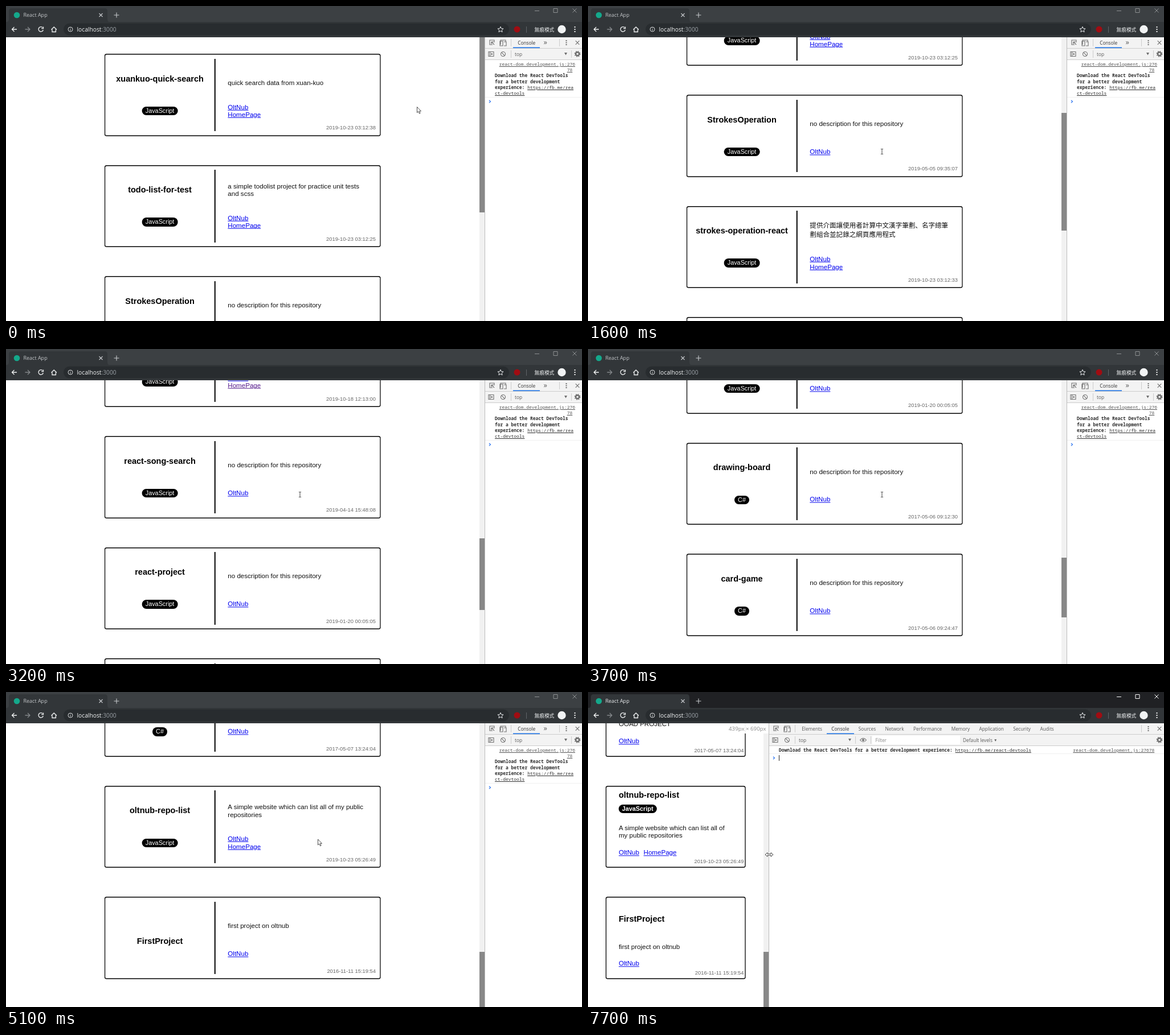
Write an HTML page that moves like this. It is 1011 px wide and 554 px high and loops after 8 s.

```html
<!DOCTYPE html>
<html lang="en">
<head>
<meta charset="utf-8">
<title>React App</title>
<style>
  html, body { margin: 0; width: 100%; height: 100%; overflow: hidden; background: #fff; }
  #stage { position: relative; width: 1011px; height: 554px; overflow: hidden; font: 8.3px "Open Sans", sans-serif; }
  #stage > *, .abs { position: absolute; }
  svg { display: block; overflow: visible; fill: none; }

  /* browser bar */
  #bar { left: 0; top: 0; --frame: #3c4043; --control: #8d9092; --title: #c3c6c9; }
  .active #bar { --frame: #202124; --control: #fff; --title: #eceef0; }
  #bar .w { stroke: #f1f3f4; stroke-width: 1.3; }
  #bar .c { stroke: var(--control); }

  /* page */
  #page { left: 0; top: 55px; height: 499px; overflow: hidden; }
  #list { position: absolute; width: 100%; font: 11.57px/13.3px Arial, "Liberation Sans", "Noto Sans CJK TC", "Noto Sans CJK", sans-serif; color: #111; }
  .card { position: absolute; left: calc(50% - .2px); transform: translateX(-50%); width: 484.5px; height: 144.5px;
    border-radius: 4px; box-shadow: inset 0 0 0 1.45px #000; }
  .card > * { position: absolute; margin: 0; }
  .card h3 { top: 35.7px; width: 194px; text-align: center; font-size: 14.47px; line-height: 16px; color: #000; }
  .card.plain h3 { top: 69.4px; }
  .lang { left: 97px; top: 92.8px; transform: translateX(-50%); padding: 0 5.8px; border-radius: 8px;
    background: #000; color: #fff; font-size: 10.85px; line-height: 15.5px; }
  .rule { left: 193px; top: 8.5px; width: 2px; height: 127.5px; background: #000; }
  .desc { left: 216.3px; bottom: 86.5px; width: 248px; }
  .desc:lang(zh) { line-height: 16px; font-weight: 300; }
  .links { left: 216.3px; top: 100.6px; transform: translateY(-50%); }
  .links span { display: block; color: #00e; text-decoration: underline; }
  .links .seen { color: #551a8b; }
  .date { right: 8.5px; top: 124.3px; font-size: 9.4px; line-height: 12px; color: #666; }
  .slim .card { width: 80%; }
  .slim h3 { left: 23.3px; top: 8px; width: auto; }
  .slim .plain h3 { top: 31px; }
  .slim .lang { left: 23.3px; top: 32.8px; transform: none; font-weight: bold; }
  .slim .rule { display: none; }
  .slim .desc { left: 23.3px; bottom: 50px; width: 195px; }
  .slim .links { left: 23.3px; top: 117.8px; display: flex; gap: 7.7px; }
  .slim .date { right: 3.5px; top: 127.6px; }
  #track { top: 55px; width: 9px; height: 499px; background: #f1f1f1; }
  #thumb { width: 100%; background: #888; }
  #size { top: 55px; height: 18px; padding: 0 4.5px; background: #fffffff0; color: #888; font-size: 9.7px; line-height: 19px; white-space: nowrap; }

  /* developer tools */
  #dev { top: 55px; right: 0; height: 499px; background: #fff; overflow: hidden; color: #5a5a5a; white-space: nowrap; }
  .row { position: absolute; left: 0; right: 0; height: 19px; background: #f3f3f3; border-bottom: 1px solid #ccc; line-height: 19px; }
  #tabs { position: absolute; left: 50px; display: flex; height: 19px; }
  #tabs span { padding: 0 8.2px; }
  #tabs .on { color: #333; box-shadow: inset 0 -1.6px #1a73e8; }
  #tabs .more { padding: 0 6px; font-size: 13px; line-height: 17px; }
  .icons { stroke: #6e6e6e; stroke-width: 1.1; }
  .icons .f { fill: #6e6e6e; stroke: none; }
  .icons .s { stroke: #ccc; stroke-width: 1; }
  #console { position: absolute; top: 39.5px; left: 0; right: 0; white-space: normal;
    font: 7.95px/10.3px "Noto Sans Mono", "DejaVu Sans Mono", monospace; color: #303030; }
  .msg { display: flow-root; padding: 2.3px 12px 1.2px 18px; border-bottom: 1px solid #f0f0f0; }
  .msg div { display: inline-block; vertical-align: top; font-weight: 600; }
  .msg u { word-break: break-all; font-weight: 400; }
  .msg .src { float: right; max-width: 97.5%; text-align: right; word-break: break-all; color: #545454; }
  #caret { position: absolute; left: 18px; width: 1px; height: 10px; margin-top: 2px; background: #222; visibility: hidden; }
  .active #caret { visibility: visible; }
  #cursor { left: 0; top: 0; }
</style>
</head>
<body>
<div id="stage">
  <div id="page"><div id="list"></div></div>
  <div id="track"><div id="thumb" class="abs"></div></div>
  <div id="size"></div>

  <div id="dev">
    <div class="row" style="top:0"><div id="tabs"></div></div>
    <div class="row" style="top:20px">
      <span class="abs" style="left:53px">top</span>
      <div id="filter" class="abs" style="left:182px;top:2px;height:15px;background:#fff;line-height:16px;text-indent:5.5px;color:#888;overflow:hidden">Filter</div>
      <span id="levels" class="abs">Default levels <span style="font-size:6.5px;vertical-align:1px">▼</span></span>
    </div>
    <svg class="icons abs" width="190" height="40" style="left:0;top:0">
      <path d="M14 13H9V5h8v4M12 8l5 5m-5-5v4m0-4h4M28 13V5h9v3M27 7h5v8h-5zM34 8h4v7h-4"/>
      <path d="M7 25.500h9v8H7zM9.500 25.500v8"/>
      <path class="f" d="M11.500 27.200l3 2.300-3 2.300zM140 27h5l-2.500 4.500z"/>
      <circle cx="32.500" cy="29.500" r="4"/><path d="M29.700 26.700l5.600 5.600"/>
      <path d="M160.500 29.500q5.500-6.500 11 0q-5.500 6.500-11 0z"/><circle class="f" cx="166" cy="29.500" r="2"/>
      <path class="s" d="M46.500 3v13M46.500 23v13M152.500 23v13M179.500 23v13"/>
    </svg>
    <svg class="icons abs" width="40" height="40" style="right:0;top:0">
      <path fill="#f3f3f3" stroke="none" d="M0 0h40v19H0zM22 20h18v19H22z"/>
      <path class="s" d="M.5 3v13"/>
      <path class="f" d="M11.500 5h2v2h-2zM11.500 8.500h2v2h-2zM11.500 12h2v2h-2z"/>
      <path d="M28.700 6.200l6.600 6.600m0-6.600l-6.600 6.600"/>
      <circle cx="32" cy="29.300" r="3" stroke-width="2.400"/><circle cx="32" cy="29.300" r="4.700" stroke-width="1.400" stroke-dasharray="1.850"/>
    </svg>
    <div id="console">
      <div class="msg"><span class="src"><u>react-dom.development.js:27678</u>&nbsp;</span><div>Download the React DevTools for a better development experience: <u>https://fb.me/react-devtools</u></div></div>
      <div id="caret"></div>
      <svg width="20" height="14"><path d="M8 4.700L10.500 7 8 9.300" stroke="#367cf1" stroke-width="1.300"/></svg>
    </div>
    <div class="abs" style="left:0;top:0;width:1px;height:499px;background:#bbb"></div>
  </div>

  <svg id="bar" width="1011" height="55">
    <path fill="var(--frame)" d="M0 0h1011v28H0z"/>
    <path fill="#323639" d="M0 28h1V28q4 0 4-5V9q0-5 5-5h163q5 0 5 5v14q0 5 4 5h829v27H0z"/>
    <circle cx="19" cy="16" r="5.300" fill="#14a88b"/>
    <text x="30.500" y="19.300" font-size="9" fill="var(--title)">React App</text>
    <path stroke="#c8cbce" stroke-width="1.100" d="M163.500 13l6 6m0-6l-6 6M189.500 16h9M194 11.500v9"/>
    <path class="c" d="M928 8.500h8M961 4.500h7v7h-7zM994.500 4.500l7 7m0-7l-7 7"/>
    <rect x="101" y="30.500" width="782" height="21" rx="10.500" fill="#282c2f"/>
    <path class="w" d="M19 41h-8.500m4-4l-4 4 4 4M64.500 38.200a4.200 4.200 0 1 0 .8 3.800M65.500 36.500v3.200h-3.400M79.500 41.500l4.700-4.500 4.700 4.500M81 41v4.500h6.400V41"/>
    <path stroke="#84888b" stroke-width="1.300" d="M33.500 41H42m-4-4l4 4-4 4"/>
    <circle cx="113" cy="41" r="4" stroke="#d5d7d9"/><path stroke="#d5d7d9" d="M113 40.500V43.500M113 38.400v1"/>
    <text x="124.500" y="45" font-size="10.250" fill="#f1f3f4">localhost<tspan fill="#9aa0a6">:3000</tspan></text>
    <path stroke="#e8eaed" d="M868 36.300l1.400 3.300 3.600.3-2.700 2.400.8 3.500-3.100-1.900-3.100 1.900.8-3.500-2.700-2.400 3.600-.3z"/>
    <circle cx="897" cy="41" r="5.500" fill="#a00c12"/>
    <path stroke="#5f6368" d="M913.500 36v11"/>
    <text x="927.500" y="45" font-size="8.700" fill="#f1f3f4" style="font-family:'Noto Sans CJK TC','Noto Sans CJK',sans-serif">無痕模式</text>
    <circle cx="975.500" cy="41" r="7.200" fill="#f1f3f4"/>
    <path fill="#f1f3f4" d="M997.500 36h2v2h-2zM997.500 40h2v2h-2zM997.500 44h2v2h-2z"/>
  </svg>

  <svg id="cursor" width="1" height="1">
    <path id="arrow" d="M0 0V10L2.300 8 4 11.800 5.600 11 4 7.400H7z" fill="#fff" stroke="#222" stroke-width=".8"/>
    <path id="beam" d="M-4-3.500h1.500L-2-3l.5-.5H0M-2-3v8M-4 5.500h1.500L-2 5l.5.5H0" stroke="#444"/>
    <path id="resize" d="M-7 0l4-3.500V-1.200H3v-2.300L7 0 3 3.500V1.200H-3v2.300z" fill="#fff" stroke="#333" stroke-width=".9"/>
  </svg>
</div>

<script>
const $ = id => document.getElementById(id);
const NONE = 'no description for this repository', JS = 'JavaScript';
// name, language, description, date, home page (2 = visited)
const repos = [
  ['xuankuo-quick-search', JS, 'quick search data from xuan-kuo', '2019-10-23 03:12:38', 1],
  ['todo-list-for-test', JS, 'a simple todolist project for practice unit tests and scss', '2019-10-23 03:12:25', 1],
  ['StrokesOperation', JS, NONE, '2019-05-05 09:35:07'],
  ['strokes-operation-react', JS, '提供介面讓使用者計算中文漢字筆劃、名字總筆劃組合並記錄之網頁應用程式', '2019-10-23 03:12:33', 1],
  ['react-todo-list', JS, NONE, '2019-04-28 10:21:36'],
  ['react-calculator', JS, NONE, '2019-10-18 12:13:00', 2],
  ['react-song-search', JS, NONE, '2019-04-14 15:48:08'],
  ['react-project', JS, NONE, '2019-01-20 00:05:05'],
  ['drawing-board', 'C#', NONE, '2017-05-06 09:12:30'],
  ['card-game', 'C#', NONE, '2017-05-06 09:24:47'],
  ['OOAD', 'C#', 'OOAD PROJECT', '2017-05-07 13:24:04'],
  ['oltnub-repo-list', JS, 'A simple website which can list all of my public repositories', '2019-10-23 05:26:49', 1],
  ['FirstProject', '', 'first project on oltnub', '2016-11-11 15:19:54'],
];
const PITCH = 195.6, VIEW = 499;
$('list').innerHTML = repos.map(([name, lang, desc, date, home], i) => `
  <div class="card ${lang ? '' : 'plain'}" style="top:${29 + i * PITCH}px">
    <h3>${name}</h3>${lang && `<span class="lang">${lang}</span>`}<i class="rule"></i>
    <p class="desc" lang="${desc > '一' ? 'zh' : 'en'}">${desc}</p>
    <div class="links"><span>OltNub</span>${home ? `<span class="${home > 1 ? 'seen' : ''}">HomePage</span>` : ''}</div>
    <span class="date">${date}</span>
  </div>`).join('');
const cards = [...$('list').children];

$('tabs').innerHTML = 'Elements Console Sources Network Performance Memory Application Security Audits'
  .split(' ').map(s => `<span class="${s === 'Console' ? 'on' : ''}">${s}</span>`).join('') + '<span class="more">»</span>';
const tabs = [...$('tabs').children], more = tabs.pop();
const tabWidths = tabs.map(tab => tab.getBoundingClientRect().width);

const clamp = u => Math.min(1, Math.max(0, u));
const ramp = (t, a, b) => { const u = clamp((t - a) / (b - a)); return u * u * (3 - 2 * u); };
const contentHeight = n => 27 + n * PITCH;
const maxScroll = n => contentHeight(n) - VIEW;

// start, end, position reached
const scrolls = [[556, 1200, maxScroll(4)], [1551, 2100, maxScroll(6)], [2356, 3000, maxScroll(8)],
  [3142, 3700, maxScroll(10)], [3932, 4300, 1845.6], [4548, 5100, maxScroll(13)]];
const moves = [[0, 400, 518, 255], [4500, 5100, 547.5, 259], [5500, 5900, 805, 285], [6000, 6400, 841, 286]];
const drag = t => 523 * (1 - (1 - clamp((t - 6650) / 980)) ** 1.15);

function layoutTabs(edge) {
  let right = edge + 50 + tabWidths[1], open = true;
  tabs.forEach((tab, i) => {
    if (i === 1) return;
    const reserve = i < tabs.length - 1 ? 24 : 0;
    open = open && right + tabWidths[i] + reserve <= 972;
    if (open) right += tabWidths[i];
    tab.hidden = !open;
  });
  more.hidden = open;
}

function render(ms) {
  const t = Math.floor(ms % 8000 / 100) * 100;
  const edge = 840 - drag(t - 68);
  $('stage').className = t >= 6700 ? 'active' : '';

  const scroll = scrolls.reduce((s, [a, b, to]) => s + (to - s) * ramp(t, a, b), 0);
  let count = 4;
  while (count < 13 && scroll >= maxScroll(count) - 1) count = Math.min(count + 2, 13);
  cards.forEach((card, i) => card.hidden = i >= count);
  $('page').className = edge < 555 ? 'slim' : '';
  $('page').style.width = edge - 9 + 'px';
  $('list').style.top = -scroll + 'px';
  $('track').style.left = edge - 9 + 'px';
  const ratio = VIEW / contentHeight(count);
  $('thumb').style.top = scroll * ratio + 'px';
  $('thumb').style.height = VIEW * ratio + 'px';

  $('size').hidden = t < 6800;
  $('size').style.right = 1011 - edge + 'px';
  $('size').textContent = Math.round(edge / .7225) + 'px × 690px';

  $('dev').style.width = 1011 - edge + 'px';
  const levels = Math.max(215, Math.min(341, 920 - edge));
  $('levels').style.left = levels + 'px';
  $('filter').style.width = levels - 187 + 'px';
  layoutTabs(edge);

  let [x, y] = moves.reduce(([px, py], [a, b, tx, ty]) => {
    const p = ramp(t, a, b);
    return [px + (tx - px) * p, py + (ty - py) * p];
  }, [721.5, 177.5]);
  x -= drag(t);
  const shape = t >= 600 && t < 4600 ? 'beam' : t >= 6300 ? 'resize' : 'arrow';
  for (const id of ['arrow', 'beam', 'resize']) $(id).style.display = id === shape ? '' : 'none';
  $('cursor').style.transform = `translate(${x}px, ${y}px)`;
}

const start = performance.now();
(function tick() {
  render(performance.now() - start);
  requestAnimationFrame(tick);
})();
</script>
</body>
</html>
```
